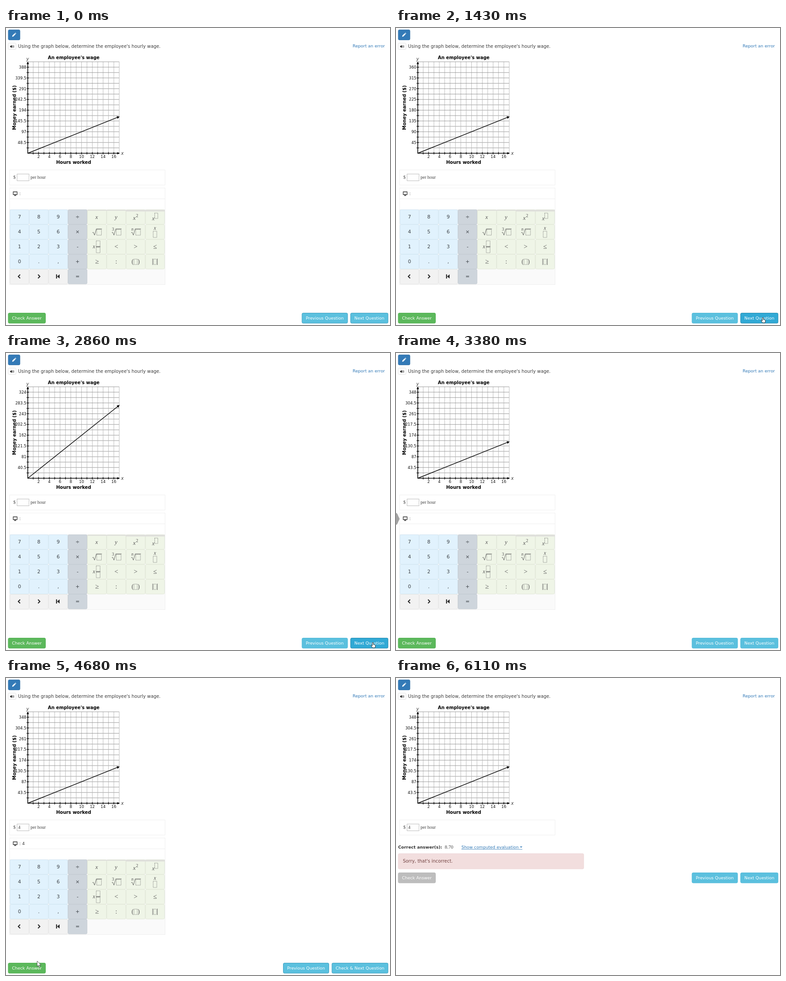
Recreate the animation shown at these times as an HTML page. Size 851x658 px, loop 6.37 s.

```html
<!DOCTYPE html>
<html lang="en">
<head>
<meta charset="utf-8">
<title>Hourly wage question</title>
<style>
  html, body { margin: 0; width: 100%; height: 100%; overflow: hidden; background: #fff; }
  svg { display: block; width: 100vw; height: 100vh; }
  text { font-family: "DejaVu Sans", sans-serif; font-size: 9.3px; fill: #3c3c3c; }
  .q { font-size: 9.92px; }
  .bold { font-weight: bold; fill: #000; }
  .tick { font-size: 8.5px; fill: #111; }
  .key { font-size: 10.8px; fill: #3c4146; }
  .serif { font-family: "Liberation Serif", serif; font-size: 10.1px; fill: #444; }
  .math { font-family: "Liberation Serif", serif; font-size: 13px; fill: #555; }
  .it { font-style: italic; }
  .mid { text-anchor: middle; }
  .end { text-anchor: end; }
  .link { fill: #337ab7; }
  .panel { fill: #fff; stroke: #efefef; }
  .line { fill: none; stroke: #555; stroke-width: .9; }
  .dash { fill: none; stroke: #666; stroke-width: .8; stroke-dasharray: 1.6 1; }
  .btn text { fill: #fff; text-anchor: middle; }
</style>
</head>
<body>
<svg id="stage" viewBox="0 0 851 658" preserveAspectRatio="none">
  <rect x="5" y="4" width="26" height="22.5" rx="2.5" fill="#337ab7" stroke="#2e6da4" stroke-width=".8"/>
  <path d="M13.6 19.4l.7-2.8 4.9-4.9 2.1 2.1-4.9 4.9zM19.8 11.1l.9-.8 2 2-.8.9z" fill="#fff"/>
  <rect x="5" y="33.5" width="17" height="14" rx="2" fill="#fff" stroke="#e2e2e2"/>
  <path d="M9 39.5h2l2.6-2v7l-2.6-2H9z" fill="#333"/>
  <path d="M15 39q1.2 2 0 4M16.7 38q2 3 0 6" fill="none" stroke="#444" stroke-width=".9"/>
  <text class="q" x="26.8" y="44.4">Using the graph below, determine the employee's hourly wage.</text>
  <text class="link" x="768.3" y="43.3" style="font-size:9.4px">Report an error</text>

  <g id="graph">
    <text class="q bold mid" x="150" y="69">An employee's wage</text>
    <text class="q bold mid" x="150" y="301">Hours worked</text>
    <text class="q bold mid" transform="translate(22 176.5) rotate(-90)">Money earned ($)</text>
    <text class="q it mid" x="48" y="72">y</text>
    <text class="q it mid" x="258" y="281">x</text>
  </g>
  <g id="labels"></g>
  <g id="wageLine">
    <path id="ray" stroke="#000" stroke-width="1.4"/>
    <path id="rayTip" d="M0 0L-6-3V3z"/>
  </g>

  <rect class="panel" x="8" y="314.5" width="344.5" height="33.5"/>
  <rect x="24.5" y="323.5" width="26.5" height="15" fill="#fff" stroke="#bcbcbc"/>
  <text class="serif" x="16.3" y="334">$</text>
  <text class="serif" x="54.2" y="334">per hour</text>
  <text class="serif" id="answer" x="27" y="334">4</text>

  <g id="pad">
    <rect class="panel" x="8" y="354.5" width="344.5" height="48"/>
    <path d="M8 378.5H352.5" stroke="#efefef"/>
    <path d="M16 363h8.6v6H16zM18 371.4h4.6M20.3 369v2" fill="none" stroke="#333" stroke-width="1.3"/>
    <text x="29.4" y="370.3">:</text>
    <text id="echo" x="35.8" y="370.3">4</text>
    <rect x="8" y="402.5" width="344.5" height="166" fill="#fafafa" stroke="#eee"/>
    <g id="keys"></g>
  </g>

  <g id="result">
    <text class="bold" x="4.8" y="377.8" style="fill:#333">Correct answer(s):</text>
    <text class="serif" x="108" y="378" style="font-size:10.9px">8.70</text>
    <text class="link" x="145" y="377.8">Show computed evaluation</text>
    <path d="M145 379.5H280" stroke="#337ab7" stroke-width=".8"/>
    <path d="M274.5 373.3h5.6l-2.8 2.8z" fill="#337ab7"/>
    <g id="alert">
      <rect x="5" y="389" width="411" height="34" rx="2.5" fill="#f2dede" stroke="#ebd3d5" stroke-width=".8"/>
      <text class="q" x="15.2" y="409.3" style="fill:#71403f">Sorry, that's incorrect.</text>
    </g>
  </g>

  <g id="buttons"></g>
  <path id="handle" d="M0 354Q3 355 5 361L8 367.5 5 374Q3 380 0 381z" fill="#a2a2a2"/>
  <path id="arrow" d="M0 0V12L2.8 9.5 4.8 14.2 6.8 13.3 4.8 8.8H8.6z" fill="#fff" stroke="#333" stroke-width=".8"/>
  <path id="hand" d="M-1.1 1Q0-.8 1.1 1V4.8L5 5.8Q6 6.2 5.7 8L4.8 12H-.6L-3.6 8Q-3.8 6.6-2.4 6.8L-1.1 8z" fill="#fff" stroke="#222" stroke-width=".9"/>
</svg>
<script>
const LOOP = 6370, STEP = 130;
const $ = id => document.getElementById(id);
const clamp = v => Math.max(0, Math.min(1, v));

function add(parent, tag, attrs, content) {
  const node = document.createElementNS(parent.namespaceURI, tag);
  for (const name in attrs) node.setAttribute(name, attrs[name]);
  if (content !== undefined) node.textContent = content;
  return parent.appendChild(node);
}
const show = (node, on) => { node.style.display = on ? '' : 'none'; };

// Graph
const X0 = 48.3, Y0 = 277.5, CELL = 11.92, CELLS = 17, SPAN = CELL * CELLS;
const graph = $('graph'), yLabels = [];
for (let i = 1; i <= CELLS; i++) {
  const x = X0 + i * CELL, y = Y0 - i * CELL;
  add(graph, 'path', { d: `M${x} ${Y0}v${-SPAN}`, stroke: '#b4b4b4', 'stroke-width': .9 });
  add(graph, 'path', { d: `M${X0} ${y}h${SPAN}`, stroke: '#8e8e8e', 'stroke-width': .9 });
  if (i === CELLS) continue;
  add(graph, 'path', { d: `M${x} ${Y0 - 2.7}v5.4M${X0 - 2.7} ${y}h5.4`, stroke: '#000', 'stroke-width': 1.2 });
  if (i % 2 === 0) {
    add(graph, 'text', { class: 'tick mid', x, y: 288 }, i);
    yLabels.push(add($('labels'), 'text', { class: 'tick end', x: 45, y: y + 3.1 }));
  }
}
add(graph, 'path', { d: `M${X0} 77V${Y0}H250`, fill: 'none', stroke: '#000', 'stroke-width': 1.6 });
add(graph, 'path', { d: `M${X0} 74l-2.6 6h5.2zM252.5 ${Y0}l-6-2.6v5.2z` });

// Keypad
const keys = $('keys'), colX = c => 29.9 + 42.9 * c, rowY = r => 418.6 + 33 * r;
const palette = {
  digit: ['#e1f2fd', '#cfe3ef'], op: ['#ced5dc', '#bfc7ce'],
  math: ['#eff5e7', '#dde4d3'], nav: ['#f2f2f2', '#e0e0e0']
};
function key(c, r, kind) {
  const [fill, stroke] = palette[kind];
  add(keys, 'rect', { x: colX(c) - 21.1, y: rowY(r) - 16, width: 42.2, height: 32.4, rx: 2.5, fill, stroke, 'stroke-width': .8 });
}
const label = (cls, x, y, str, size) =>
  add(keys, 'text', { class: cls, x, y, ...(size && { style: `font-size:${size}px` }) }, str);
const dashed = (x, y, width, height) => add(keys, 'rect', { class: 'dash', x, y, width, height });
const stroke = d => add(keys, 'path', { class: 'line', d });

['789÷', '456×', '123-', '0.,+', '   ='].forEach((row, r) => [...row].forEach((ch, c) => {
  key(c, r, c === 3 ? 'op' : r === 4 ? 'nav' : 'digit');
  if (ch !== ' ') label('key mid', colX(c), rowY(r) + 3.7, ch);
}));
for (let r = 0; r < 4; r++) for (let c = 4; c < 8; c++) key(c, r, 'math');
add(keys, 'path', { d: 'M181 404H352M266 405.5H352', stroke: '#dfdfdc', 'stroke-width': 2 });

label('math it mid', 201, 422.5, 'x');
label('math it mid', 244, 422.5, 'y');
label('math it mid', 284.5, 424.5, 'x');
label('math mid', 290.5, 419, '2', 10);
label('math it mid', 326.5, 425.5, 'x', 12);
dashed(329.5, 410, 7, 12);

function root(x, boxX, index) {
  stroke(`M${x} 453.5l2-1 2.8 6.5 4-14H${boxX + 11.5}`);
  dashed(boxX, 446.5, 10.5, 12.5);
  if (index) label('math mid' + (index === 'n' ? ' it' : ''), x + 2.6, 449, index, 9.5);
}
root(191.5, 201);
root(234.5, 244.5, '3');
root(277.5, 287.5, 'n');
label('math it mid', 330, 447, 'x', 11.5);
dashed(326.2, 450, 8, 14);
label('math it mid', 194.8, 488, 'x', 12);
dashed(200, 471.5, 8.5, 12);
dashed(200, 486, 8.5, 12);
stroke('M199 484.7h10.5');
[['<', 5, 2], ['>', 6, 2], ['≤', 7, 2], ['≥', 4, 3], [':', 5, 3]]
  .forEach(([ch, c, r]) => label('math mid', colX(c), rowY(r) + 4.6, ch, 15));
label('math mid', 280.5, 522, '(', 14);
label('math mid', 294, 522, ')', 14);
dashed(283.5, 512, 7.5, 12);
stroke('M325 511v14M335.5 511v14');
dashed(327, 512, 6.5, 12);
add(keys, 'path', {
  d: 'M31.3 546.2l-4 4.2 4 4.2M71 546.2l4 4.2-4 4.2M112 545.8v9.2',
  fill: 'none', stroke: '#2c2c2c', 'stroke-width': 2.2
});
add(keys, 'path', { d: 'M118.8 545.8v9.2l-5.6-4.6z', fill: '#2c2c2c' });

// Buttons
function button(str, x, width) {
  const group = add($('buttons'), 'g', { class: 'btn' });
  const face = add(group, 'rect', { x, y: 631.5, width, height: 22.5, rx: 2.5, 'stroke-width': 1 });
  const text = add(group, 'text', { x: x + width / 2, y: 646.2 }, str);
  return {
    paint(fill, edge) { face.setAttribute('fill', fill); face.setAttribute('stroke', edge); },
    place(left, w, caption) {
      face.setAttribute('x', left);
      face.setAttribute('width', w);
      text.setAttribute('x', left + w / 2);
      text.textContent = caption;
    }
  };
}
const check = button('Check Answer', 5, 82.5);
const prev = button('Previous Question', 656, 101);
const next = button('Next Question', 763.7, 83);

// Timeline: question start, scale per two cells, slope in cells
const questions = [[0, 48.5, .4], [1430, 45, .4], [2210, 40.5, .8], [2990, 43.5, .4]];
const TYPED = 3900, CHECKED = 5070;
const moves = [
  [390, 800, 668], [1040, 813, 641], [2860, 813, 641], [3380, -12, 360],
  [3900, -12, 420], [4680, 69, 627], [4810, 69, 640], [5330, 69, 640], [5850, 70, 668]
];

function pointer(t) {
  const i = moves.findIndex(m => m[0] > t);
  if (i < 1) return [-50, -50];
  const [t0, x0, y0] = moves[i - 1], [t1, x1, y1] = moves[i];
  const k = clamp((t - t0) / (t1 - t0)), e = k * k * (3 - 2 * k);
  return [x0 + (x1 - x0) * e, y0 + (y1 - y0) * e];
}

let shownQuestion;
function showQuestion(question) {
  if (question === shownQuestion) return;
  shownQuestion = question;
  const [, scale, slope] = question, rise = SPAN * slope;
  yLabels.forEach((node, i) => { node.textContent = scale * (i + 1); });
  const tipX = X0 + SPAN + .8, tipY = Y0 - rise - .3;
  $('ray').setAttribute('d', `M${X0} ${Y0}L${tipX - 2} ${tipY + 2 * slope}`);
  $('rayTip').setAttribute('transform', `translate(${tipX} ${tipY}) rotate(${-Math.atan(slope) * 180 / Math.PI})`);
}

function draw(t) {
  showQuestion(questions.filter(q => q[0] <= t).pop());
  const typed = t >= TYPED, checked = t >= CHECKED, combined = typed && !checked;
  show($('answer'), typed);
  show($('echo'), typed);
  show($('pad'), !checked);
  show($('result'), checked);
  $('alert').setAttribute('opacity', clamp((t - 4950) / 400));
  show($('handle'), t >= 3380 && t < 3640);

  const [x, y] = pointer(t), inRow = y >= 631 && y <= 654;
  const overNext = !checked && inRow && x > 764;
  const overCheck = !checked && inRow && x > 5 && x < 87;
  const hand = overNext || overCheck || checked;
  for (const [id, on] of [['hand', hand], ['arrow', !hand]]) {
    show($(id), on);
    $(id).setAttribute('transform', `translate(${x} ${y})`);
  }

  $('buttons').setAttribute('transform', `translate(0 ${checked ? -200 : 0})`);
  const edge = t < 390 || combined ? '#3f9fc0' : '#51b9d9';
  if (checked) check.paint('#bdbdbd', '#b6b6b6');
  else check.paint(overCheck ? '#449d44' : '#5cb85c', '#4cae4c');
  prev.paint('#5bc0de', edge);
  if (overNext) next.paint('#31a9d5', '#2589ad');
  else next.paint('#5bc0de', edge);
  prev.place(combined ? 614.5 : 656, 101, 'Previous Question');
  if (combined) next.place(722.3, 124.4, 'Check & Next Question');
  else next.place(763.7, 83, 'Next Question');
}

const start = performance.now();
function tick() {
  const t = (performance.now() - start) % LOOP;
  draw(Math.floor(t / STEP) * STEP);
  requestAnimationFrame(tick);
}
tick();
</script>
</body>
</html>
```
